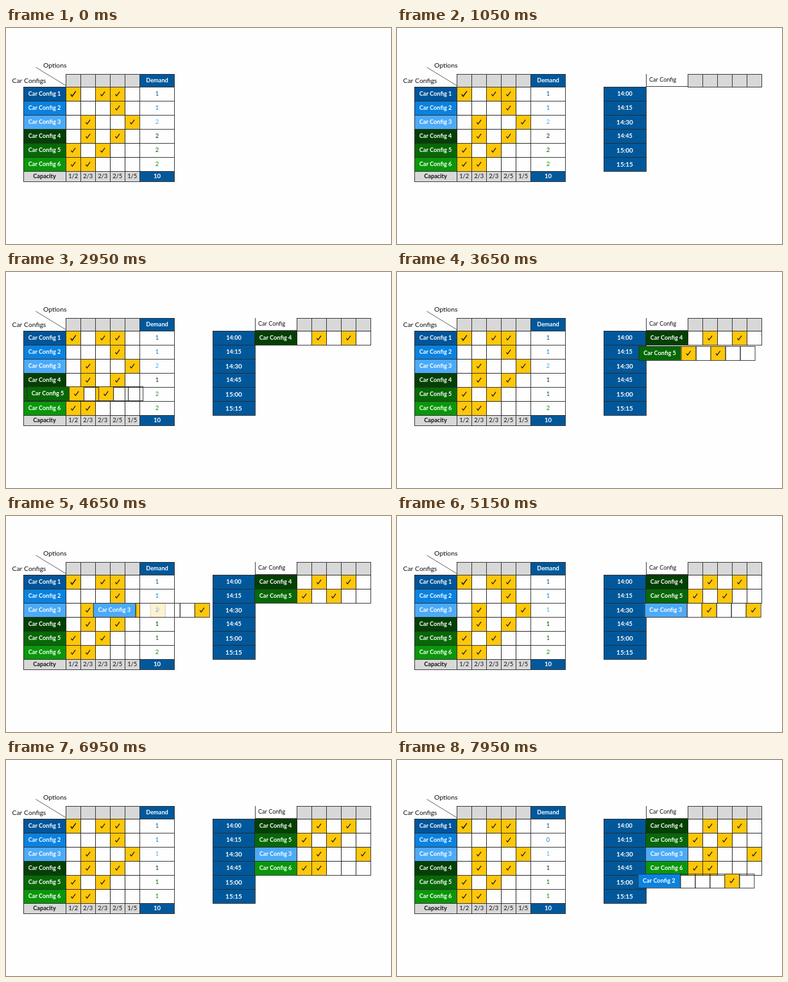
An HTML page with a canvas for the animation above (8000 ms loop, 600 by 338 pixels).

```html
<!DOCTYPE html>
<html>
<head>
<meta charset="utf-8">
<style>
html, body { margin: 0; width: 100%; height: 100%; overflow: hidden; background: #fefefe; }
canvas { display: block; }
</style>
</head>
<body>
<canvas id="stage" width="600" height="338"></canvas>
<script>
const ctx = document.getElementById('stage').getContext('2d');
const LOOP = 8000, MOVE = 880, FADE = 500, SHIFT = 360;
const BLUE = '#00589b', GRAY = '#d8d8d8', YELLOW = '#fec70a', INK = '#111', RULE = '#2b2b2b';
const LEFT = 27, CELLS = 93, CELL_W = 23, ROW_H = 22, TOP = 92;

// start: when the row leaves; slot: its line in the schedule
const rows = [
  { color: '#00559a', options: [0, 2, 3], demand: 1 },
  { color: '#0a82e0', options: [3], demand: 1, start: 7183, slot: 4 },
  { color: '#4caaf8', options: [1, 4], demand: 2, start: 4309, slot: 2 },
  { color: '#034003', options: [1, 3], demand: 2, start: 1433, slot: 0 },
  { color: '#076806', options: [0, 2], demand: 2, start: 2877, slot: 1 },
  { color: '#0a970a', options: [0, 1], demand: 2, start: 5762, slot: 3 }
];
const capacity = ['1/2', '2/3', '2/3', '2/5', '1/5'];
const times = ['14:00', '14:15', '14:30', '14:45', '15:00', '15:15'];

const clamp = v => Math.max(0, Math.min(1, v));
const ease = t => t < 0.5 ? 2 * t * t : 1 - 2 * (1 - t) * (1 - t);
const rowY = i => TOP + i * ROW_H;

function box(x, y, w, h, fill) {
  if (fill) {
    ctx.fillStyle = fill;
    ctx.fillRect(x, y, w, h);
  }
  ctx.strokeStyle = RULE;
  ctx.strokeRect(x + 0.5, y + 0.5, w, h);
}

function line(color, ...p) {
  ctx.strokeStyle = color;
  ctx.beginPath();
  for (let i = 0; i < p.length; i += 2) ctx.lineTo(p[i], p[i + 1]);
  ctx.stroke();
}

function text(str, x, y, size, color, weight = 400, align = 'center') {
  ctx.font = `${weight} ${size}px Lato, "Open Sans", sans-serif`;
  ctx.textAlign = align;
  ctx.fillStyle = color;
  ctx.fillText(str, x, y + size * 0.36);
}

function check(x, y, scale) {
  ctx.save();
  ctx.translate(x, y);
  ctx.scale(scale, scale);
  ctx.lineWidth = 1.3;
  line(INK, -3.6, 0.6, -1.5, 3.6, 3.8, -3.8);
  ctx.restore();
}

function configRow(i, x, y, big) {
  const row = rows[i];
  box(x, y, CELLS - LEFT, ROW_H, row.color);
  text('Car Config ' + (i + 1), x + 33, y + 11, 9.2, '#fff', 700);
  for (let c = 0; c < 5; c++) {
    const cx = x + CELLS - LEFT + c * CELL_W, on = row.options.includes(c);
    box(cx, y, CELL_W, ROW_H, on && YELLOW);
    if (on) check(cx + 11.7, y + 11, big && c === 0 ? 1.1 : 0.9);
  }
}

function mover(i, t) {
  const { start, slot } = rows[i];
  if (t < start) return;
  const k = ease(clamp((t - start) / MOVE));
  configRow(i, LEFT + SHIFT * k, rowY(i) + (slot - i) * ROW_H * k);
}

// Old and new numbers cross-fade on their own white boxes.
function demandCell(i, t) {
  const { color, demand, start } = rows[i], y = rowY(i);
  const p = start ? clamp((t - start + 20) / FADE) : 0;
  [[demand, 1 - p], [demand - 1, p]].forEach(([n, alpha]) => {
    if (!alpha) return;
    ctx.globalAlpha = alpha;
    ctx.fillStyle = '#fefefe';
    ctx.fillRect(208, y, 55, ROW_H);
    text(n, 235.5, y + 11, 9.4, color);
  });
  ctx.globalAlpha = 1;
  box(208, y, 54, ROW_H);
}

function headerCells(x) {
  for (let c = 0; c < 5; c++) box(x + c * CELL_W, 72, CELL_W, 20, GRAY);
}

function schedule(t) {
  ctx.globalAlpha = clamp((t - 470) / 550);
  times.forEach((label, i) => {
    box(322, rowY(i), 66, ROW_H, BLUE);
    const large = i === 2 || i > 3;
    text(label, 355, rowY(i) + 11, large ? 10 : 9.2, '#fff', 700);
  });
  line(RULE, 388.5, 72, 388.5, 92);
  line(RULE, 388, 91.5, 454, 91.5);
  text('Car Config', 393, 80.5, 9.1, INK, 400, 'left');
  headerCells(CELLS + SHIFT);
  ctx.globalAlpha = 1;
}

function draw(t) {
  ctx.fillStyle = '#fefefe';
  ctx.fillRect(0, 0, 600, 338);
  ctx.lineWidth = 0.9;
  schedule(t);

  line('#555', 46.5, 61.5, 93, 90);
  text('Options', 58, 58.7, 10.4, INK, 400, 'left');
  text('Car Configs', 9.5, 82.7, 10.4, INK, 400, 'left');
  headerCells(CELLS);
  box(208, 72, 54, 20, BLUE);
  text('Demand', 235.5, 82, 9.2, '#fff', 700);

  // The last row leaves from beneath its own table line.
  rows.forEach((row, i) => {
    if (i === 5) mover(i, t);
    configRow(i, LEFT, rowY(i), i === 0);
  });

  box(LEFT, 224, 66, 16, GRAY);
  text('Capacity', 60, 232, 9.2, INK, 700);
  capacity.forEach((label, c) => {
    box(CELLS + c * CELL_W, 224, CELL_W, 16, GRAY);
    text(label, CELLS + 11.7 + c * CELL_W, 232, 9.4, INK);
  });
  box(208, 224, 54, 16, BLUE);
  text('10', 235.5, 232, 9.6, '#fff', 700);

  mover(2, t);
  mover(1, t);
  rows.forEach((row, i) => demandCell(i, t));
  mover(3, t);
  mover(4, t);
}

const begin = performance.now();
function tick() {
  draw((performance.now() - begin) % LOOP);
  requestAnimationFrame(tick);
}
tick();
</script>
</body>
</html>
```
